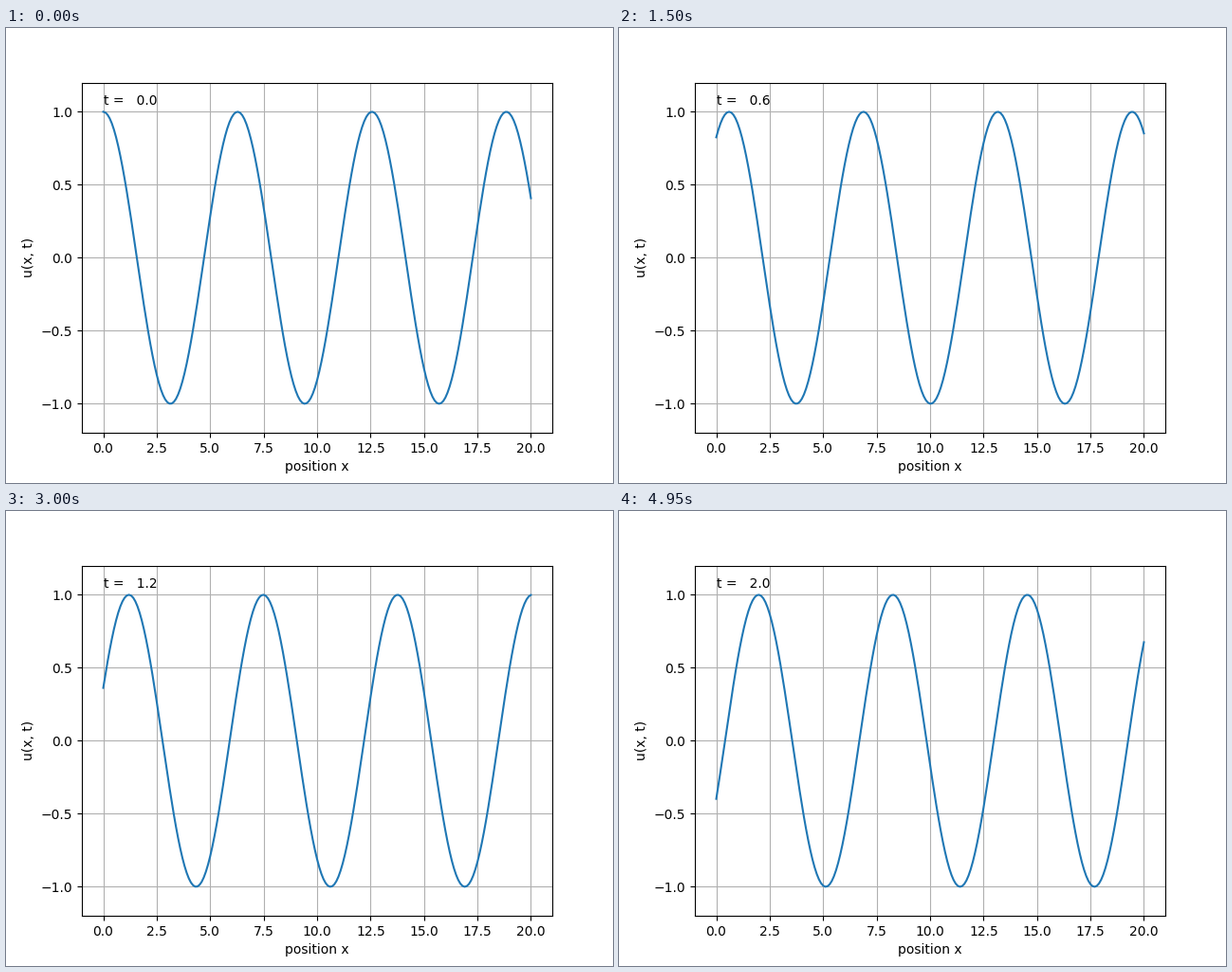
Animation, 640 px wide and 480 px high, one loop 5 s. Source, as a matplotlib script:

```python
import numpy as np
import matplotlib.pyplot as plt
from matplotlib.animation import FuncAnimation

FRAMES = 100
INTERVAL = 50   # ms
DT = 0.02       # simulated time per frame

plt.rcParams["font.family"] = "DejaVu Sans"

fig, ax = plt.subplots(figsize=(6.4, 4.8), dpi=100)
x = np.linspace(0, 20, 201)
(wave,) = ax.plot(x, np.cos(x), color="#1f77b4", lw=1.5)
clock = ax.text(0, 1.05, "")

ax.set_xlim(-1, 21)
ax.set_ylim(-1.2, 1.2)
ax.set_xticks(np.arange(0, 20.1, 2.5))
ax.set_yticks(np.arange(-1, 1.1, 0.5))
ax.set_xlabel("position x")
ax.set_ylabel("u(x, t)")
ax.grid(True)


def update(frame):
    """Show the travelling wave u = cos(x - t)."""
    t = frame * DT
    wave.set_ydata(np.cos(x - t))
    clock.set_text(f"t = {t:5.1f}")
    return wave, clock


anim = FuncAnimation(fig, update, frames=FRAMES, interval=INTERVAL,
                     repeat=True, repeat_delay=0, blit=False)
plt.show()
```
